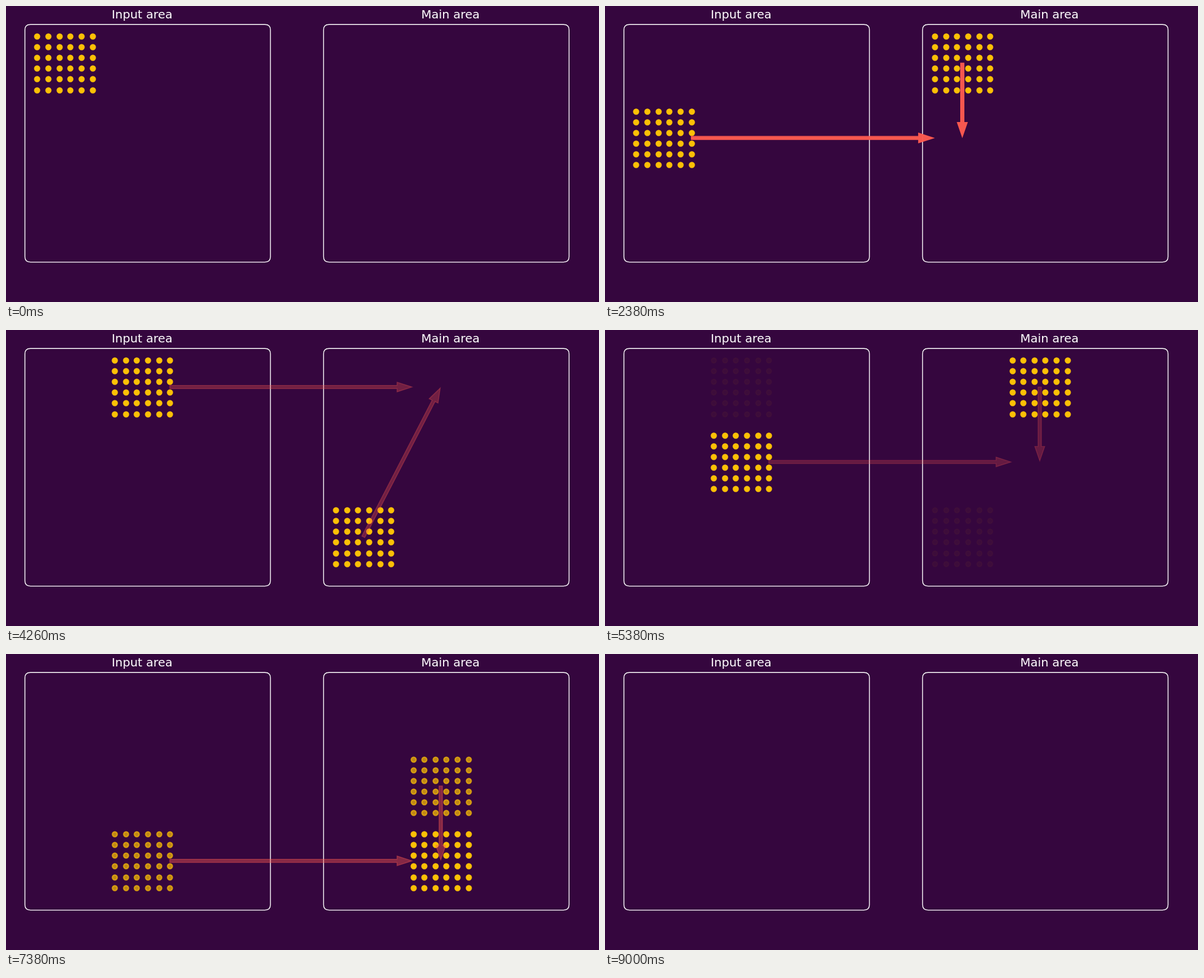
An HTML page with a canvas for the animation above (9.6 s loop, 1000 by 500 pixels).

```html
<!DOCTYPE html>
<html lang="en">
<head>
<meta charset="utf-8">
<title>Input area and main area</title>
<style>
  html, body { margin: 0; width: 100%; height: 100%; overflow: hidden; background: #35063e; }
  canvas { display: block; }
</style>
</head>
<body>
<canvas id="stage" width="1000" height="500"></canvas>
<script>
const ctx = document.getElementById('stage').getContext('2d');

const BACKGROUND = '#35063e', DOT = '#fcc006', ARROW = '#fc5a50', LINE = '#ffffff';
const LOOP = 9600, FRAME = 20, STEP = 1200;

// Grid units: blocks are 6 x 6 dots, spaced 7 units apart, three per column.
const UNIT_X = 18.66, UNIT_Y = 18.08, LEFT = 52.29, TOP = 51.12;
const BLOCK = 6, PITCH = 7, ROWS = 3, SLOTS = 6;
const MAIN = 503.6 / UNIT_X; // distance from the input area to the main area

const toX = u => LEFT + u * UNIT_X;
const toY = v => TOP + v * UNIT_Y;
const slot = (index, offset) => ({
  u: offset + PITCH * Math.floor(index / ROWS),
  v: PITCH * (index % ROWS)
});
const isSlot = index => index >= 0 && index < SLOTS;
const snap = value => Math.floor(value + 0.5) + 0.5;

function drawArea(x, title, titleX) {
  const y = 31.2, right = x + 414, bottom = y + 401.4, rx = 9.3, ry = 9;
  ctx.strokeStyle = LINE;
  ctx.lineWidth = 1.39;
  ctx.beginPath();
  ctx.moveTo(x + rx, y);
  ctx.lineTo(right - rx, y);
  ctx.quadraticCurveTo(right, y, right, y + ry);
  ctx.lineTo(right, bottom - ry);
  ctx.quadraticCurveTo(right, bottom, right - rx, bottom);
  ctx.lineTo(x + rx, bottom);
  ctx.quadraticCurveTo(x, bottom, x, bottom - ry);
  ctx.lineTo(x, y + ry);
  ctx.quadraticCurveTo(x, y, x + rx, y);
  ctx.closePath();
  ctx.stroke();

  ctx.fillStyle = LINE;
  ctx.font = '20px "DejaVu Sans", sans-serif';
  ctx.textAlign = 'center';
  ctx.fillText(title, titleX, 21);
}

// Fill and edge overlap, so faded shapes keep a brighter rim.
function paint(color, alpha, width) {
  ctx.globalAlpha = alpha;
  ctx.fillStyle = ctx.strokeStyle = color;
  ctx.lineWidth = width;
  ctx.fill();
  ctx.stroke();
  ctx.globalAlpha = 1;
}

function drawBlock(index, offset, alpha) {
  if (!isSlot(index) || alpha <= 0) return;
  const { u, v } = slot(index, offset);
  for (let row = 0; row < BLOCK; row++) {
    for (let col = 0; col < BLOCK; col++) {
      ctx.beginPath();
      ctx.arc(snap(toX(u + col)), snap(toY(v + row)), 4.17, 0, 2 * Math.PI);
      paint(DOT, alpha, 2.08);
    }
  }
}

function drawArrow(u0, v0, u1, v1, alpha) {
  const length = Math.hypot(u1 - u0, v1 - v0);
  const du = (u1 - u0) / length, dv = (v1 - v0) / length;
  const tip = length - 0.1, neck = tip - 1.35, body = 0.15, head = 0.45;
  const outline = [[0, body], [neck, body], [neck, head], [tip, 0],
                   [neck, -head], [neck, -body], [0, -body]];
  ctx.beginPath();
  for (const [along, side] of outline) {
    ctx.lineTo(toX(u0 + along * du - side * dv), toY(v0 + along * dv + side * du));
  }
  ctx.closePath();
  paint(ARROW, alpha, 1.39);
}

function drawMoves(index, alpha) {
  if (!isSlot(index) || alpha <= 0) return;
  const half = (BLOCK - 1) / 2;
  const from = slot(index, 0), to = slot(index, MAIN);
  drawArrow(from.u + 2 * half, from.v + half, to.u, to.v + half, alpha);
  if (index > 0) {
    const previous = slot(index - 1, MAIN);
    drawArrow(previous.u + half, previous.v + half, to.u + half, to.v + half, alpha);
  }
}

function draw(time) {
  const t = Math.floor(time % LOOP / FRAME) * FRAME;
  const step = Math.floor(t / STEP);
  const phase = t % STEP / STEP;

  ctx.fillStyle = BACKGROUND;
  ctx.fillRect(0, 0, 1000, 500);
  drawArea(31.9, 'Input area', 229.5);
  drawArea(535.5, 'Main area', 749.5);

  const fading = 1 - 2 * phase;
  drawBlock(step - 1, 0, fading);
  drawBlock(step - 2, MAIN, fading);
  drawBlock(step, 0, 1);
  drawBlock(step - 1, MAIN, 1);

  drawMoves(step - 1, 1 - 4 * phase);
  drawMoves(step, phase * phase);
}

const start = performance.now();
function tick() {
  draw(performance.now() - start);
  requestAnimationFrame(tick);
}
tick();
</script>
</body>
</html>
```
